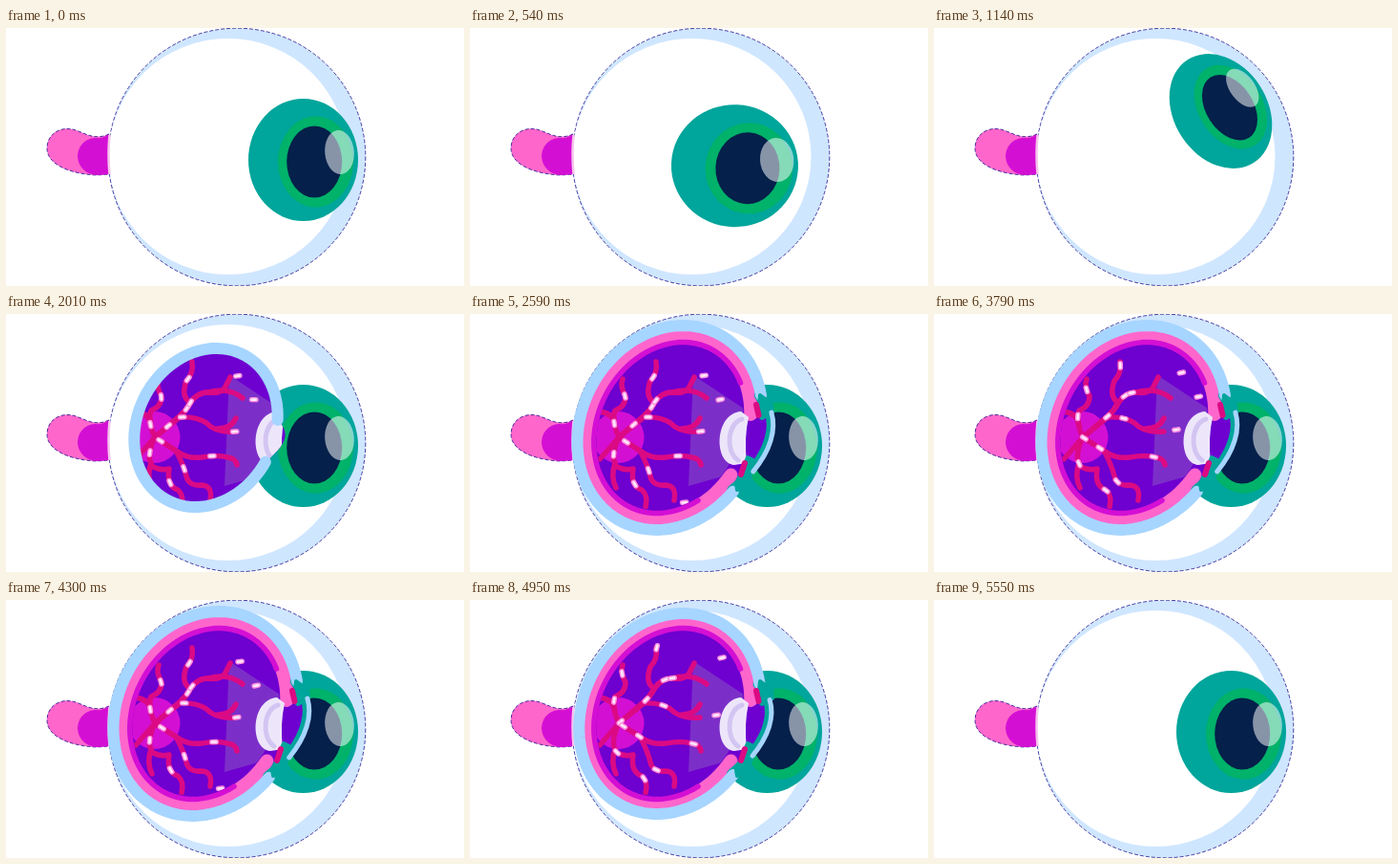
Write an HTML page that moves like this. It is 480 px wide and 270 px high and loops after 5580 ms.

```html
<!DOCTYPE html>
<html lang="en">
<head>
<meta charset="utf-8">
<title>Eye cross-section</title>
<style>
  html, body { margin: 0; width: 100%; height: 100%; overflow: hidden; background: #fff; }
  svg { display: block; width: 100vw; height: 100vh; }
</style>
</head>
<body>
<svg viewBox="0 0 480 270">
  <defs>
    <clipPath id="openingClip"><path id="openingShape"/></clipPath>
    <clipPath id="retinaClip"><ellipse cx="209.5" cy="119" rx="73" ry="89.5" transform="rotate(28 209.5 119)"/></clipPath>
  </defs>

  <g stroke="#1c0f8c" stroke-width=".8" stroke-dasharray="4 2">
    <path fill="#ff66cc" d="M108 111C95 117 86 112 76 108C60 101 43 109 43 126C43 144 70 153 95 154L108 153Z"/>
    <circle cx="242" cy="135" r="134.8" fill="#cfe6ff"/>
  </g>
  <path fill="#d40fd4" d="M108 111Q102 116 93 115C81 116 75 125 75 135C76 146 84 153 95 154L108 153Z"/>
  <ellipse cx="232.5" cy="134.5" rx="125" ry="123.5" fill="#fff"/>
  <path d="M108.500 112Q106.500 132 108.500 153" fill="none" stroke="#f6c3ee" stroke-width="2.500"/>

  <g id="iris">
    <ellipse rx="57.5" ry="64" fill="#00a59b"/>
    <ellipse cx="13" cy="2" rx="39.5" ry="47.5" fill="#00b26a"/>
    <ellipse cx="11.700" cy="2" rx="29" ry="37.5" fill="#05204a"/>
    <ellipse cx="38" cy="-8" rx="15.300" ry="23" fill="#fff" opacity=".52" transform="rotate(-5 38 -8)"/>
  </g>

  <g id="cutout" fill="none" stroke-linecap="round" stroke-linejoin="round">
    <g clip-path="url(#openingClip)">
      <rect width="480" height="270" fill="#6e00d0"/>
      <g clip-path="url(#retinaClip)">
        <circle cx="155.5" cy="129" r="27" fill="#d40fd4"/>
        <path d="M234 64L290 101L275 167L229 180Z" fill="#7c2fc8"/>
        <g id="veins" stroke="#db0a84" stroke-width="5.500"></g>
        <g id="pulses" fill="#ffe6fb" stroke="#ff8fe0" stroke-width="1.400"></g>
      </g>
      <path id="pinkWall" stroke="#ff66cc" stroke-width="14"/>
      <path id="choroid" stroke="#d40fd4" stroke-width="5.500"/>
      <path fill="#ede6fb" d="M284 102C256 104 255 156 277 158L290 156Q287 130 292 108Z"/>
      <path stroke="#d3c5f2" stroke-width="5" d="M285 110C270 114 267 144 281 153"/>
      <path id="irisRoot" stroke="#00a59b"/>
    </g>
    <path id="blueWall" stroke="#a6d5ff" stroke-width="12"/>
    <g id="ciliary">
      <g fill="#00a59b" stroke="#00a59b" stroke-width="4">
        <path d="M304 85L316 94L317 103L306 109L302 105Z"/>
        <path d="M280 184L279 178L291 150L299 154L290 180Z"/>
      </g>
      <path stroke="#db0a84" stroke-width="6" d="M300 95L302.500 106M288 156L284 168"/>
      <path id="cornea" stroke="#a6d5ff" stroke-width="5" pathLength="100" stroke-dasharray="57 100" stroke-dashoffset="-18"/>
    </g>
  </g>
</svg>
<script>
const LOOP = 5580, PULSE = 570;
const TILT = 28 * Math.PI / 180, CX = 209.5, CY = 119;
const $ = id => document.getElementById(id);
const clamp = v => Math.max(0, Math.min(1, v));
const span = (t, from, to) => clamp((t - from) / (to - from));
const lerp = (a, b, p) => a + (b - a) * p;
const inOut = p => p < .5 ? 4 * p ** 3 : 1 - 4 * (1 - p) ** 3;

function add(parent, tag, attrs) {
  const el = document.createElementNS('http://www.w3.org/2000/svg', tag);
  for (const key in attrs) el.setAttribute(key, attrs[key]);
  return parent.appendChild(el);
}

// Point on the tilted wall ellipse; the angle is in its own frame.
function wallPoint(rx, ry, deg) {
  const a = deg * Math.PI / 180, x = rx * Math.cos(a), y = ry * Math.sin(a);
  return [CX + x * Math.cos(TILT) - y * Math.sin(TILT), CY + x * Math.sin(TILT) + y * Math.cos(TILT)];
}

function wallArc(rx, ry, lower, upper) {
  const points = [];
  for (let i = 0; i <= 90; i++) {
    points.push(wallPoint(rx, ry, lerp(lower, 360 + upper, i / 90)).map(v => v.toFixed(2)).join(' '));
  }
  return 'M' + points.join('L');
}

$('choroid').setAttribute('d', wallArc(75.5, 93, 35, -55));
$('pinkWall').setAttribute('d', wallArc(80.5, 98.5, 8, -32));

const trunk = 'M156 129L182 107Q189 101 193 93';
const lowerTrunk = 'M156 129L178 143';
// vein, run past its end, pulse offset
const routes = [
  [trunk + 'Q183 86 189 70Q197 62 195 50', 'L200 42L214 37', .12],
  [trunk + 'Q200 82 212 82Q226 84 230 76L235 66', 'L248 64L266 60', .3],
  [trunk + 'Q200 82 212 82Q233 76 248 88', 'L260 90L280 86', .33],
  ['M156 129L182 108Q200 107 210 114Q220 125 241 123', 'L262 120', .28],
  [lowerTrunk + 'Q190 152 205 150Q222 147 232 150Q241 151 242 158', 'L257 142', .03],
  [lowerTrunk + 'Q186 157 190 173Q194 180 204 179Q217 179 214 195', 'L218 198L236 196', .36],
  ['M156 129Q146 150 154 160Q162 164 171 162Q168 180 180 184Q187 190 184 202', '', .15],
  ['M156 129Q148 112 152 101Q163 97 163 86Q157 76 160 68', '', .18]
];
const twigs = 'M222 120Q236 120 241 109M152 156Q147 170 153 182M156 129L136 152M136 102Q150 104 152 116';
add($('veins'), 'path', { d: twigs });

const pulses = [];
for (const [vein, tail, offset] of routes) {
  add($('veins'), 'path', { d: vein });
  const path = add($('pulses'), 'path', { d: vein + tail, fill: 'none', stroke: 'none' });
  for (const shift of [0, .5]) {
    const dot = add($('pulses'), 'rect', { x: -4.2, y: -2, width: 8.4, height: 4, rx: 2 });
    pulses.push({ path, dot, length: path.getTotalLength(), offset: offset + shift });
  }
}

function irisPose(t) {
  const rest = [311.5, 138, 0, 1], front = [277, 140.5, 0, 1.17], up = [300.5, 87, -33, .85];
  const blend = (a, b, p) => a.map((v, i) => lerp(v, b[i], p));
  if (t < 840) {
    const p = inOut(span(t, 0, 660)), dip = Math.sin(Math.PI * p);
    const pose = blend(rest, front, p), sag = 4 * p * (1 - p);
    return [pose[0] - 4 * sag, pose[1] + 41 * sag, 33 * dip, pose[3] - .13 * dip];
  }
  if (t < 1320) return blend(front, up, inOut(span(t, 840, 1140)));
  const pose = blend(up, rest, inOut(span(t, 1320, 1860)));
  pose[0] += 6 * Math.sin(Math.PI * span(t, 1700, 2005));
  return pose;
}

function openness(t) {
  const opened = 1 - (1 - span(t, 1720, 2440)) ** 3;
  return opened * (1 - span(t, 4850, 5550) ** 2.1);
}

function drawCutout(t) {
  const s = openness(t);
  $('cutout').style.display = s > .01 ? '' : 'none';
  if (s <= .01) return;

  // The wall keeps its thickness while its outer edge scales.
  const rx = Math.max(.1, 98.8 * s - 6), ry = Math.max(.1, 116.6 * s - 6);
  const gap = Math.max(0, 28.5 - 61 * (1 - s));
  const lower = -14 + gap, upper = -14 - gap;
  const [x0, y0] = wallPoint(rx, ry, upper), [x1, y1] = wallPoint(rx, ry, lower);
  const bulge = `C${x0 + .85 * gap} ${y0 + .85 * gap} ${x1 + 1.5 * gap} ${y1 - 1.25 * gap} ${x1} ${y1}`;
  const ring = wallArc(rx, ry, lower, upper);
  const front = span(gap, 17, 24);
  $('blueWall').setAttribute('d', ring);
  $('blueWall').setAttribute('stroke-width', Math.min(12, 98 * s));
  $('openingShape').setAttribute('d', ring + bulge + 'Z');
  for (const id of ['cornea', 'irisRoot']) $(id).setAttribute('d', `M${x0} ${y0}` + bulge);
  $('irisRoot').setAttribute('stroke-width', 14 * front);
  $('ciliary').setAttribute('opacity', front);

  for (const { path, dot, length, offset } of pulses) {
    const at = (t / PULSE + offset) % 1 * length;
    const a = path.getPointAtLength(Math.max(0, at - 2)), b = path.getPointAtLength(Math.min(length, at + 2));
    const angle = Math.atan2(b.y - a.y, b.x - a.x) * 180 / Math.PI;
    dot.setAttribute('transform', `translate(${(a.x + b.x) / 2} ${(a.y + b.y) / 2}) rotate(${angle})`);
  }
}

function draw(t) {
  const [x, y, turn, squash] = irisPose(t);
  $('iris').setAttribute('transform', `translate(${x} ${y}) rotate(${turn}) scale(${squash} 1)`);
  drawCutout(t);
}

const start = performance.now();
function tick() {
  draw((performance.now() - start) % LOOP);
  requestAnimationFrame(tick);
}
tick();
</script>
</body>
</html>
```
